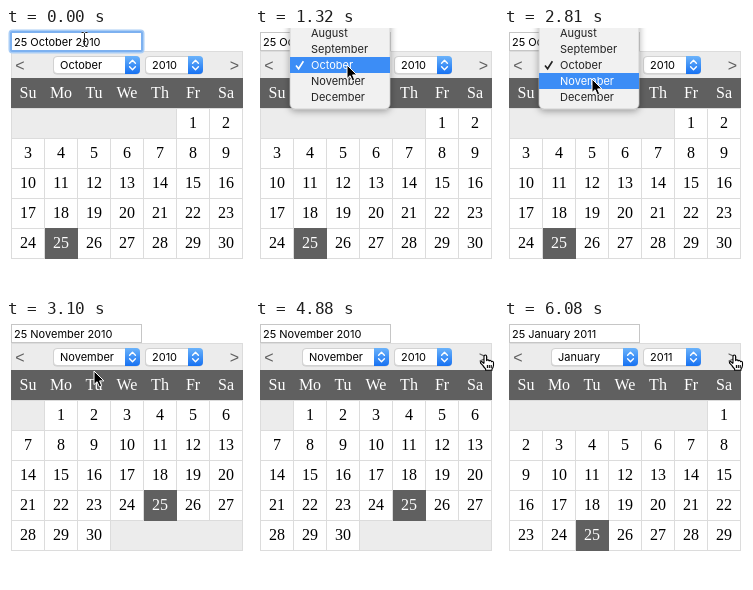
An HTML page for the animation above (8000 ms loop, 243 by 264 pixels).

```html
<!DOCTYPE html>
<html lang="en">
<head>
<meta charset="utf-8">
<title>Date picker</title>
<style>
  html, body { margin: 0; width: 100%; height: 100%; overflow: hidden; background: #fff; }
  svg { display: block; width: 243px; height: 264px; }
  .ui { font: 11px Inter, "Liberation Sans", sans-serif; }
  .day { font: 16px "Liberation Serif", "Times New Roman", serif; text-anchor: middle; }
  .nav { font: 16px "Liberation Sans", Arial, sans-serif; text-anchor: middle; }
</style>
</head>
<body>
<svg id="stage" viewBox="0 0 243 264" xmlns="http://www.w3.org/2000/svg"></svg>
<script>
const LOOP = 8000;
const GREY = '#ececec', DARK = '#606060', LINE = '#dcdcdc';
const stage = document.getElementById('stage');

// Every timeline entry begins with its start time in ms.
// first: weekday of day 1, last: last day drawn, rows: week rows drawn
const MONTHS = [
  [0, { name: 'October', year: 2010, first: 5, last: 30, rows: 5 }],
  [3100, { name: 'November', year: 2010, first: 1, last: 30, rows: 5 }],
  [5030, { name: 'December', year: 2010, first: 3, last: 31, rows: 6 }],
  [6080, { name: 'January', year: 2011, first: 6, last: 29, rows: 5 }]
];

const POINTER = [
  [0, 'beam', 74, 3], [290, 'beam', 86, 11], [440, 'beam', 89, 14], [590, 'beam', 92, 14],
  [880, 'arrow', 94, 26], [1020, 'arrow', 90, 34], [1170, 'arrow', 91, 36],
  [2370, 'arrow', 88, 44], [2510, 'arrow', 87, 50], [4000, 'arrow', 112, 50],
  [4150, 'arrow', 114, 50], [4290, 'arrow', 180, 38], [4440, 'arrow', 211, 33],
  [4590, 'hand', 217, 34], [4730, 'hand', 223, 34], [4880, 'hand', 224, 34]
];

// highlighted row of the open menu: -1 means none, null means closed
const MENU = [[0, null], [1320, 2], [2510, 3], [2660, -1], [2810, 3], [2950, null]];

const SHAPES = {
  beam: ['M1.5 1.5H3.5L4.5 2.5 5.5 1.5H7.5M4.5 2.5V14.5M1.5 15.5H3.5L4.5 14.5 5.5 15.5H7.5M3 10.5H6',
    'fill="none" stroke="#222" stroke-width="1"'],
  arrow: ['M1 1V14.6L4.1 11.7 6.3 16.8 8.7 15.8 6.6 10.9H10.9Z',
    'fill="#000" stroke="#fff" stroke-width="1"'],
  hand: ['M5 9.6V2.6Q5 1 6.3 1T7.6 2.6V6.6Q8 5.7 9 5.9T10.1 7Q10.6 6.2 11.5 6.5T12.5 7.8' +
    'Q13 7.1 13.8 7.4T14.5 8.8V11.5Q14.3 13.5 13 14.8V16.3H6.6V14.9Q5 13.3 3.8 11.4L1.6 9.2' +
    'Q1.1 8 2.2 7.6 3.2 7.4 5 9.6M8.4 11V14M10.3 11V14M12.2 11V14',
    'fill="#fff" stroke="#000" stroke-width="1.1" stroke-linejoin="round"']
};

const latest = (list, t) => list.filter(entry => entry[0] <= t).pop();
const rect = (x, y, w, h, fill, more = '') =>
  `<rect x="${x}" y="${y}" width="${w}" height="${h}" fill="${fill}" ${more}/>`;
const text = (cls, x, y, s, fill = '#000') =>
  `<text class="${cls}" x="${x}" y="${y}" fill="${fill}">${s}</text>`;
const path = (d, more) => `<path d="${d}" ${more}/>`;

const colX = c => c === 7 ? 237 : 5 + 33 * c;
const midX = c => 22 + 33 * c;

function field(value, focus, caret) {
  const box = focus
    ? rect(3.5, 2.5, 134, 22, 'none', 'rx="3" stroke="#a9cdf6" stroke-width="2"') +
      rect(5, 4, 131, 19, '#fff', 'rx="1" stroke="#7db1f0" stroke-width="2"')
    : rect(5.5, 4.5, 130, 18, '#fff', 'stroke="#c6c6c6"');
  return box + text('ui', 8, 18, value) + (caret ? rect(77, 7, 1, 13, '#000') : '');
}

function select(x, w, label) {
  const s = x + w - 15;
  return rect(x, 28.6, w, 18, '#000', 'rx="4" opacity=".14"') +
    rect(x + .5, 28.5, w - 1, 17, '#fff', 'rx="3.5" stroke="#d2d2d2"') +
    path(`M${s} 28H${s + 11}q4 0 4 4V42q0 4 -4 4H${s}Z`, 'fill="url(#blue)"') +
    path(`M${s + 4.6} 35.2l2.9 -2.9 2.9 2.9M${s + 4.6} 38.8l2.9 2.9 2.9 -2.9`,
      'fill="none" stroke="#fff" stroke-width="1.4" stroke-linecap="round" stroke-linejoin="round"') +
    text('ui', x + 7, 41, label);
}

function cell(from, to, row, fill) {
  const x = colX(from), y = 80 + 30 * row;
  return rect(x + .5, y + .5, colX(to) - x - (to < 7 ? 0 : 1), 30, fill, `stroke="${LINE}"`);
}

function calendar(m) {
  let out = rect(5.5, 23.5, 231, 27, GREY, `stroke="${LINE}"`) +
    text('nav', 13.8, 42.5, '&lt;', DARK) + text('nav', 228.5, 42.5, '&gt;', DARK) +
    select(47, 87, m.name) + select(139, 58, m.year) +
    rect(5, 50, 232, 30, DARK);
  'Su Mo Tu We Th Fr Sa'.split(' ').forEach((d, c) => out += text('day', midX(c), 70, d, '#fff'));
  if (m.first) out += cell(0, m.first, 0, GREY);
  const end = (m.first + m.last) % 7;
  if (end) out += cell(end, 7, 4, GREY);
  if (m.rows > 5) out += rect(5, 230, 232, 31, GREY) + path('M5.5 230V261M236.5 230V261', `stroke="${LINE}"`);
  let days = '';
  for (let d = 1; d <= m.last; d++) {
    const i = d + m.first - 1, c = i % 7, r = Math.floor(i / 7), y = 80 + 30 * r;
    const chosen = d === 25;
    out += cell(c, c + 1, r, '#fff');
    if (chosen) days += rect(colX(c) + 1, y, colX(c + 1) - colX(c) - (c < 6 ? 0 : 1), 31, DARK);
    days += text('day', midX(c), y + 20, d, chosen ? '#fff' : '#000');
  }
  return out + days;
}

function menu(active) {
  let out = '<g filter="url(#shade)">' +
    rect(35, -20, 100, 101, '#f1f1f1', 'rx="5" stroke="#bdbdbd" stroke-width=".6"') + '</g>';
  if (active >= 0) out += rect(35, 29 + 16 * (active - 2), 100, 16, '#3c8df6');
  ['August', 'September', 'October', 'November', 'December'].forEach((name, i) =>
    out += text('ui', 56, 9 + 16 * i, name, i === active ? '#fff' : '#222'));
  return out + path('M41 37.6l2.6 3.2 4.8 -7.6',
    `fill="none" stroke="${active === 2 ? '#fff' : '#222'}" stroke-width="1.6"`);
}

function pointer([, kind, x, y]) {
  const [d, style] = SHAPES[kind];
  const halo = kind === 'beam' ? path(d, 'fill="none" stroke="#fff" stroke-width="2" opacity=".6"') : '';
  return `<g transform="translate(${x} ${y})">${halo}${path(d, style)}</g>`;
}

const DEFS = `<defs>
  <linearGradient id="blue" x2="0" y2="1"><stop stop-color="#6bb3fb"/><stop offset="1" stop-color="#1671f2"/></linearGradient>
  <filter id="shade" x="-20%" y="-20%" width="140%" height="140%"><feDropShadow dx="0" dy="2" stdDeviation="3.5" flood-opacity=".35"/></filter>
</defs>`;

let shown = '';
function draw(t) {
  const month = latest(MONTHS, t)[1], active = latest(MENU, t)[1];
  const caret = t >= 290 && t < 730;
  const svg = DEFS + rect(0, 0, 243, 264, '#fff') + calendar(month) +
    field(`25 ${month.name} ${month.year}`, t < 1320, caret) +
    (active === null ? '' : menu(active)) + pointer(latest(POINTER, t));
  if (svg !== shown) stage.innerHTML = shown = svg;
}

const start = performance.now();
function tick() {
  draw((performance.now() - start) % LOOP);
  requestAnimationFrame(tick);
}
tick();
</script>
</body>
</html>
```
